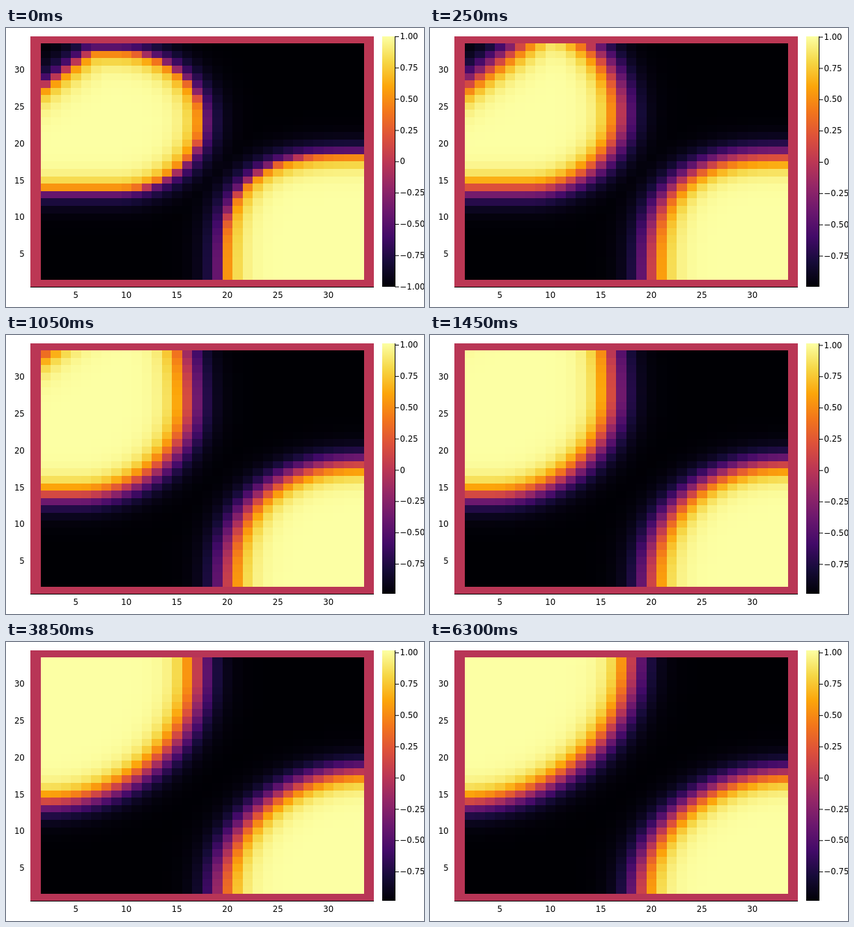
Recreate the animation shown at these times as an HTML page with a canvas. Size 600x400 px, loop 6.4 s.

```html
<!DOCTYPE html>
<html lang="en">
<head>
<meta charset="utf-8">
<title>Phase separation</title>
<style>
  html, body { margin: 0; width: 100%; height: 100%; overflow: hidden; background: #fff; }
  canvas { display: block; width: 600px; height: 400px; }
</style>
</head>
<body>
<canvas id="stage" width="600" height="400"></canvas>
<script>
const ctx = document.getElementById('stage').getContext('2d');
const LOOP = 6400, STEP = 50;
const FIRST = 2, LAST = 33;
const TOP = 12, BOTTOM = 371.5;

const stops = '000004 160B39 420A68 6A176E 932667 BC3754 DD513A F3761B FCA50A F6D746 FCFFA4'
  .split(' ').map(h => [0, 2, 4].map(i => parseInt(h.slice(i, i + 2), 16)));

const mix = (a, b, p) => a + (b - a) * p;
const clamp = (v, lo, hi) => Math.min(hi, Math.max(lo, v));
const decay = (t, tau) => Math.exp(-t / tau);

function inferno(v) {
  const x = clamp(v, 0, 1) * (stops.length - 1);
  const i = Math.min(Math.floor(x), stops.length - 2);
  return `rgb(${stops[i].map((c, k) => Math.round(mix(c, stops[i + 1][k], x - i)))})`;
}

// Approximate signed distance to a superellipse quadrant, positive inside.
function inside(dx, dy, a, b, n) {
  const X = Math.max(0, dx) / a, Y = Math.max(0, dy) / b;
  const f = Math.pow(X ** n + Y ** n, 1 / n);
  if (f === 0) return Math.min(a, b);
  const slope = Math.hypot((X / f) ** (n - 1) / a, (Y / f) ** (n - 1) / b);
  return (1 - f) / slope;
}

// The upper blob settles into the top left corner, whose dark wedge closes early.
function upperBlob(t) {
  const cx = 1.2 + 7.8 * decay(t, 1600);
  const cy = 34.5 - 11.5 * decay(t, 3000);
  const a = 15.5 + 0.41 * t / 1000 + 2.1 * decay(t, 600) - cx;
  const below = cy - 13.75 + 0.35 * decay(t, 200);
  const above = 9.5 + t / 90;
  const wedge = 6 - (t / 430) ** 2;
  return (x, y) => Math.min(
    y < cy ? inside(x - cx, cy - y, a, below, 2) : inside(x - cx, y - cy, a, above, 2),
    (x - 1.5 + 33.5 - y - wedge) / Math.SQRT2);
}

// The lower blob relaxes from a boxy shape to a quarter ellipse.
function lowerBlob(t) {
  const a = 13.4 + 0.2 * t / 1000 + 0.7 * decay(t, 200);
  const b = 16.8 - 0.07 * t / 1000 + 0.2 * decay(t, 200);
  const n = 2 + 1.1 * decay(t, 900);
  return (x, y) => inside(33.5 - x, y - 1.5, a, b, n);
}

const colX = c => Math.round(20.8 + 14.5 * c);
const rowY = r => Math.round(381.91 - 10.58 * r);

function drawField(t, zero) {
  ctx.fillStyle = inferno(zero);
  ctx.fillRect(35, TOP, 493, 359);
  const upper = upperBlob(t), lower = lowerBlob(t);
  const sharp = 0.28 * decay(t, 80);
  for (let r = FIRST; r <= LAST; r++) {
    for (let c = FIRST; c <= LAST; c++) {
      const s = Math.max(upper(c, r), lower(c, r));
      const u = Math.tanh(0.55 * s + sharp * Math.tanh(3 * s));
      const x = colX(c), y = rowY(r + 1);
      ctx.fillStyle = inferno((u + 1) / 2);
      ctx.fillRect(x, y, colX(c + 1) - x, rowY(r) - y);
    }
  }
}

function text(s, x, y, align) {
  ctx.textAlign = align;
  ctx.fillText(s, x, y);
}

function drawAxes() {
  ctx.fillStyle = '#000';
  ctx.fillRect(35, 371, 493, 1);
  for (let v = 5; v <= 30; v += 5) {
    text(v, 100.2 + 14.5 * (v - 5), 386.8, 'center');
    text(v, 26.8, 328.3 - 10.58 * (v - 5), 'right');
  }
}

const ramp = ctx.createLinearGradient(0, BOTTOM, 0, TOP);
stops.forEach((_, i) => {
  const p = i / (stops.length - 1);
  ramp.addColorStop(p, inferno(p));
});

function drawBar(min, max) {
  ctx.fillStyle = ramp;
  ctx.fillRect(540, TOP, 18, 359);
  ctx.fillStyle = '#000';
  ctx.fillRect(558, TOP, 1, 359);
  for (let v = -1; v <= 1; v += 0.25) {
    if (v < min) continue;
    const y = mix(BOTTOM, TOP, (v - min) / (max - min));
    ctx.fillRect(558, y - 0.5, 6, 1);
    const label = v === 0 ? '0' : (v < 0 ? '\u2212' : '') + Math.abs(v).toFixed(2);
    text(label, 565.5, y + 3.7, 'left');
  }
}

function draw(now) {
  const t = Math.floor((now % LOOP) / STEP) * STEP;
  const shift = 0.0185 * (1 - decay(t, 1000));
  const min = shift - 1.002, max = shift + 1.002;
  ctx.fillStyle = '#fff';
  ctx.fillRect(0, 0, 600, 400);
  ctx.font = '11.7px "DejaVu Sans", sans-serif';
  drawField(t, -min / (max - min));
  drawAxes();
  drawBar(min, max);
}

let start = null;
function tick(now) {
  if (start === null) start = now;
  draw(now - start);
  requestAnimationFrame(tick);
}
draw(0);
requestAnimationFrame(tick);
</script>
</body>
</html>
```
